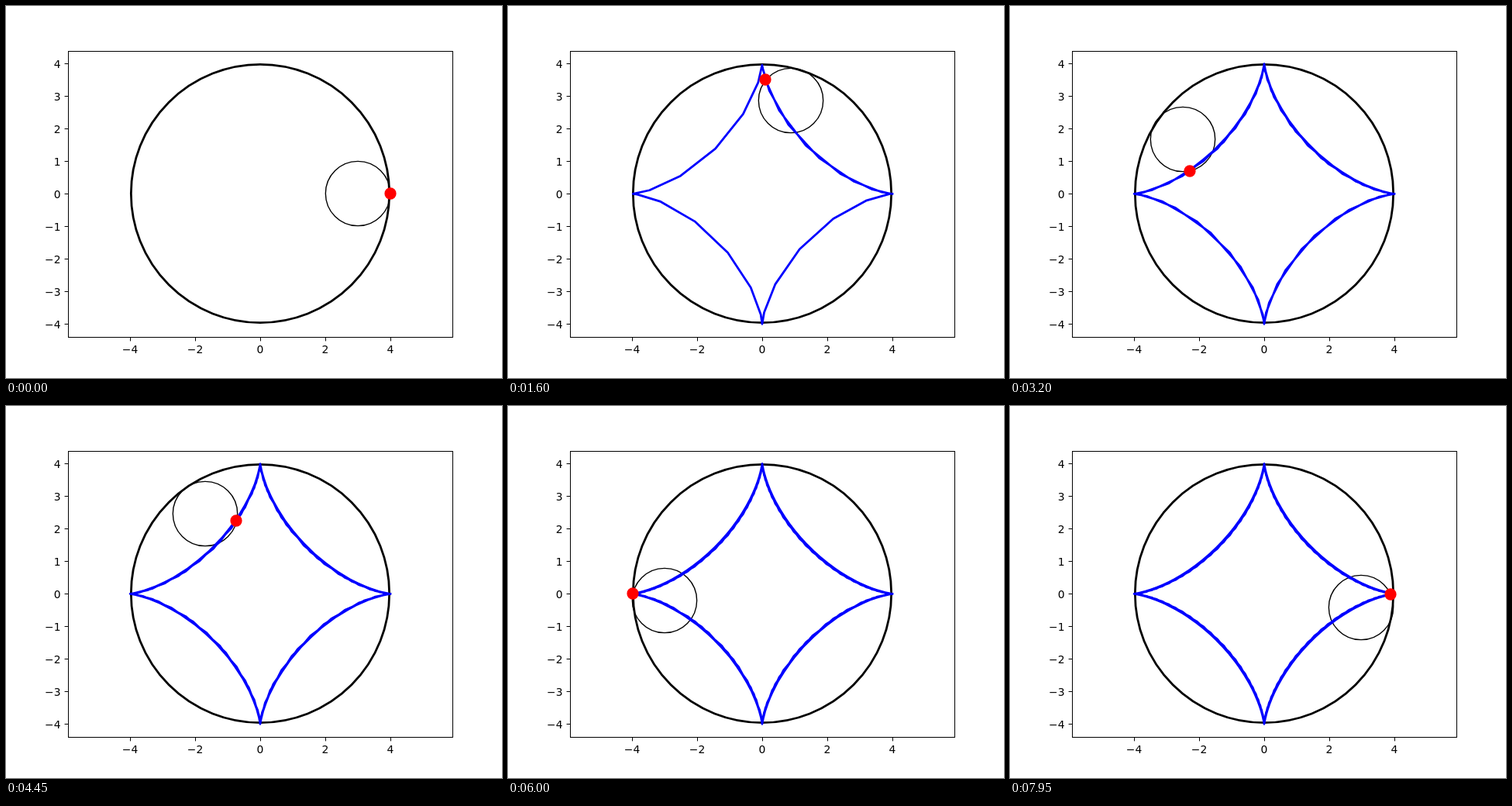
An HTML page with a canvas for the animation above (8 s loop, 640 by 480 pixels).

```html
<!DOCTYPE html>
<html lang="en">
<head>
<meta charset="utf-8">
<title>Hypocycloid</title>
<style>
  html, body { margin: 0; width: 100%; height: 100%; overflow: hidden; background: #fff; }
  canvas { display: block; }
</style>
</head>
<body>
<canvas width="640" height="480"></canvas>
<script>
const ctx = document.querySelector('canvas').getContext('2d');
const TAU = Math.PI * 2;
const STEP_MS = 50, STEPS = 160;
const STEP_ANGLE = 5 * TAU / 133;
const POINT = 100 / 72;           // one typographic point in pixels
const UNIT = 42, CX = 328, CY = 242.4;
const AXES = { left: 80, right: 576, top: 58, bottom: 427 };

const px = x => CX + x * UNIT;
const py = y => CY - y * UNIT;
const tracer = a => [px(4 * Math.cos(a) ** 3), py(4 * Math.sin(a) ** 3)];

function line(x1, y1, x2, y2) {
  ctx.beginPath();
  ctx.moveTo(x1, y1);
  ctx.lineTo(x2, y2);
  ctx.stroke();
}

// Markers sit on whole pixels.
function circlePath(x, y, radius) {
  ctx.beginPath();
  ctx.arc(Math.round(x), Math.round(y), radius, 0, TAU);
}

function ring(x, y, diameterPt, widthPt) {
  circlePath(x, y, diameterPt * POINT / 2);
  ctx.strokeStyle = '#000';
  ctx.lineWidth = widthPt * POINT;
  ctx.stroke();
}

function drawAxes() {
  const { left, right, top, bottom } = AXES;
  const label = v => String(v).replace('-', '\u2212');
  ctx.strokeStyle = ctx.fillStyle = '#000';
  ctx.lineWidth = 1;
  ctx.lineCap = 'butt';
  ctx.strokeRect(left + 0.5, top + 0.5, right - left, bottom - top);
  ctx.font = `${10 * POINT}px "DejaVu Sans", sans-serif`;

  ctx.textAlign = 'center';
  for (let v = -4; v <= 4; v += 2) {
    const x = Math.round(px(v));
    line(x + 0.5, bottom + 1, x + 0.5, bottom + 5.4);
    ctx.fillText(label(v), x, 448);
  }
  ctx.textAlign = 'right';
  for (let v = -4; v <= 4; v++) {
    const y = Math.round(py(v));
    line(left - 4.4, y + 0.5, left, y + 0.5);
    ctx.fillText(label(v), 70.5, y + 6);
  }
}

function drawTrail(step) {
  ctx.beginPath();
  for (let i = 0; i <= step; i++) ctx.lineTo(...tracer(i * STEP_ANGLE));
  ctx.strokeStyle = '#00f';
  ctx.lineWidth = 2 * POINT;
  ctx.lineJoin = 'round';
  ctx.lineCap = 'square';
  ctx.stroke();
  ctx.lineJoin = 'miter';
}

function draw(step) {
  const angle = step * STEP_ANGLE;
  ctx.fillStyle = '#fff';
  ctx.fillRect(0, 0, 640, 480);
  ring(CX, CY, 240, 2);
  ring(px(3 * Math.cos(angle)), py(3 * Math.sin(angle)), 60, 1);
  if (step > 0) drawTrail(step);
  circlePath(...tracer(angle), 5.5 * POINT);
  ctx.fillStyle = '#f00';
  ctx.fill();
  drawAxes();
}

function tick() {
  draw(Math.floor(performance.now() / STEP_MS) % STEPS);
  requestAnimationFrame(tick);
}
tick();
</script>
</body>
</html>
```
